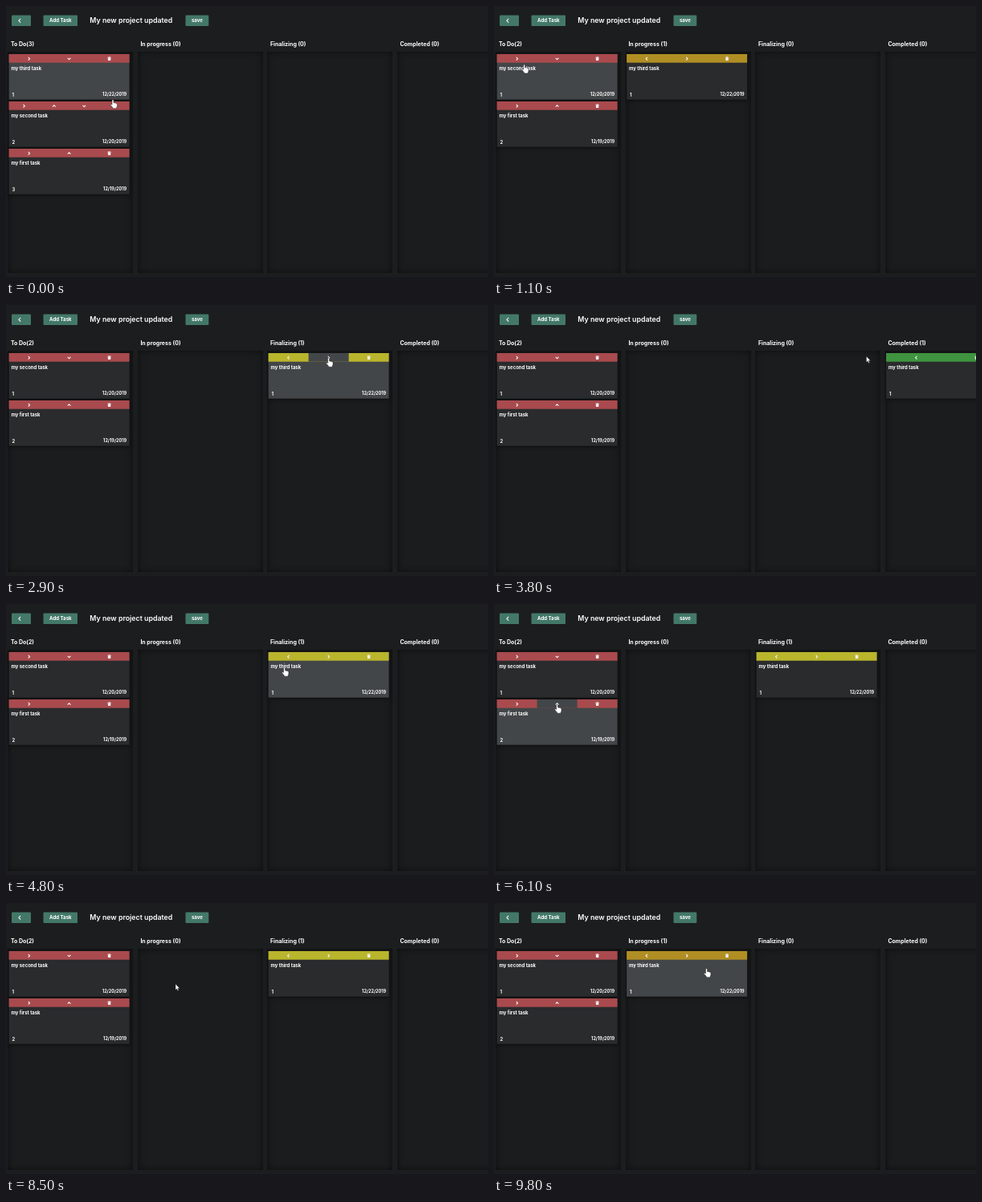
Write an HTML page that moves like this. It is 600 by 338 pixels and loops after 9.9 s.

```html
<!DOCTYPE html>
<html lang="en">
<head>
<meta charset="utf-8">
<title>Task board</title>
<style>
  html, body { margin: 0; width: 100%; height: 100%; overflow: hidden; background: #1c1d1e; }
  #stage { position: relative; width: 600px; height: 338px; overflow: hidden; }
  .col { position: absolute; top: 57px; width: 156px; height: 276px; background: #1b1c1d; box-shadow: inset 0 0 8px rgba(0, 0, 0, .55); }
  svg { position: absolute; left: 0; top: 0; }
  text { font-family: Inter, "Open Sans", sans-serif; font-weight: 700; fill: #fff; }
  .title { font-size: 8.8px; font-weight: 600; }
  .btn { font-size: 6.1px; text-anchor: middle; }
  .head { font-size: 7px; }
  .name { font-size: 5.95px; }
  .num { font-size: 5.8px; }
  .date { font-size: 5.5px; text-anchor: end; }
  .card { filter: drop-shadow(0 1px 2px rgba(0, 0, 0, .55)); }
  .line { fill: none; stroke: #f4f4f4; stroke-width: 1.1; }
</style>
</head>
<body>
<div id="stage">
  <svg width="600" height="338" viewBox="0 0 600 338">
    <g fill="#437868">
      <rect x="7" y="11.5" width="24" height="13.5" rx="1"/>
      <rect x="46.5" y="11.5" width="42.5" height="13.5" rx="1"/>
      <rect x="223.5" y="11.5" width="28.8" height="13.5" rx="1"/>
    </g>
    <path class="line" d="M18.2 15.8L15.9 18.2L18.2 20.6"/>
    <text class="btn" x="67.8" y="20.3">Add Task</text>
    <text class="btn" x="237.9" y="20.1">save</text>
    <text class="title" x="104.3" y="21.4">My new project updated</text>
    <g id="board"></g>
    <path id="arrow" d="M0 0V7.4L1.7 5.9L2.8 8.5L4 8L2.9 5.4H5.2Z" fill="#fff" stroke="#111" stroke-width=".4"/>
    <path id="hand" d="M-1 .9Q0 -.6 1 .9V4.1L2.3 4.2Q2.9 4 3.3 4.5L4.5 4.8Q5.4 4.8 5.4 5.9V8.4L4.6 10V11.2H-.1V10.2L-2.9 6.9Q-3.3 5.7 -2.1 5.7L-1 6.6Z" fill="#fff" stroke="#111" stroke-width=".45"/>
  </svg>
</div>
<script>
const LOOP = 9900, STEP = 100, PITCH = 161.5, ROW = 59;
const CARD = { x: 3.6, y: 60, w: 150, h: 56.7, bar: 10.7 };

const columns = [
  ['To Do', '#a94a4e'],
  ['In progress ', '#b08e24'],
  ['Finalizing ', '#b9b52c'],
  ['Completed ', '#3f9440']
];
const tasks = {
  a: ['my first task', '12/19/2019'],
  b: ['my second task', '12/20/2019'],
  c: ['my third task', '12/22/2019']
};

// Board contents from each click on, columns split by "|"
const boards = [
  [0, 'cba|||'], [800, 'ba|c||'], [2200, 'ba||c|'], [3000, 'ba|||c'],
  [4300, 'ba||c|'], [6500, 'ab||c|'], [7400, 'ba||c|'], [9400, 'ba|c||']
];

// Centre of button i out of n on a card
const button = (col, row, i, n) => [
  CARD.x + col * PITCH + (i + .5) * CARD.w / n,
  CARD.y + row * ROW + 6
];

// Pointer stops: arrival, departure, place, sag of the way there
const stops = [
  [0, 0, [133, 116.6]],
  [600, 1000, button(0, 0, 0, 3)],
  [1800, 2200, button(1, 0, 1, 3), 50],
  [2700, 3200, button(2, 0, 1, 3), 60],
  [3800, 3800, [463.5, 64], 18],
  [4100, 4400, button(3, 0, 0, 2)],
  [4600, 4700, [533, 45]],
  [4800, 4800, [346.5, 79]],
  [5000, 5100, [250, 69.5]],
  [6000, 6600, button(0, 1, 1, 3), 10],
  [7100, 8100, button(0, 0, 1, 3)],
  [8500, 8500, [211, 101]],
  [9300, 9400, button(2, 0, 0, 3)],
  [9800, LOOP, [264.5, 81.5]]
];

const icons = {
  right: '<path class="line" d="M-.9 -1.9L1 0L-.9 1.9"/>',
  left: '<path class="line" d="M.9 -1.9L-1 0L.9 1.9"/>',
  down: '<path class="line" d="M-1.9 -.8L0 1L1.9 -.8"/>',
  up: '<path class="line" d="M-1.9 .9L0 -.9L1.9 .9"/>',
  bin: '<path fill="#f4f4f4" d="M-2.2 -2H-.8V-2.5H.8V-2H2.2V-1.3H-2.2ZM-1.8 -.9H1.8L1.6 2.4H-1.6Z"/>'
};

const stage = document.getElementById('stage');
const board = document.getElementById('board');
const arrow = document.getElementById('arrow');
const hand = document.getElementById('hand');

columns.forEach((_, i) => {
  const col = document.createElement('div');
  col.className = 'col';
  col.style.left = 2 + i * PITCH + 'px';
  stage.prepend(col);
});

function pointerAt(t) {
  const i = stops.findIndex(s => t <= s[1]);
  const [arrive, , [x1, y1], sag = 0] = stops[i];
  if (t >= arrive) return [x1, y1];
  const [, leave, [x0, y0]] = stops[i - 1];
  const u = (t - leave) / (arrive - leave);
  const k = u * u * (3 - 2 * u);
  return [x0 + (x1 - x0) * k, y0 + (y1 - y0) * k + sag * Math.sin(Math.PI * k)];
}

function buttonsFor(col, row, count) {
  if (col === 3) return ['left', 'bin'];
  if (col > 0) return ['left', 'right', 'bin'];
  const list = ['right'];
  if (row > 0) list.push('up');
  if (row < count - 1) list.push('down');
  return [...list, 'bin'];
}

function drawCard(id, col, row, count, px, py) {
  const x = CARD.x + col * PITCH, y = CARD.y + row * ROW;
  const dx = px - x, dy = py - y;
  const over = dx >= 0 && dx < CARD.w && dy >= 0 && dy <= CARD.h;
  const fill = over ? '#424648' : '#2a2b2d';
  const list = buttonsFor(col, row, count), w = CARD.w / list.length;
  const hot = over && dy < CARD.bar
    ? `<rect x="${Math.floor(dx / w) * w}" width="${w}" height="${CARD.bar}" fill="${fill}"/>` : '';
  const marks = list.map((icon, i) =>
    `<g transform="translate(${(i + .5) * w} 5.7)">${icons[icon]}</g>`).join('');
  const [name, date] = tasks[id];
  const html = `<g transform="translate(${x} ${y})">
    <rect class="card" width="${CARD.w}" height="${CARD.h}" fill="${fill}"/>
    <rect width="${CARD.w}" height="${CARD.bar}" fill="${columns[col][1]}"/>${hot}${marks}
    <text class="name" x="2.9" y="19.6">${name}</text>
    <text class="num" x="4" y="53.1">${row + 1}</text>
    <text class="date" x="146.6" y="52.2">${date}</text></g>`;
  return { html, over };
}

let last = '';
function render(now) {
  const t = Math.floor((now % LOOP) / STEP) * STEP;
  const [px, py] = pointerAt(t);
  const layout = boards.filter(b => b[0] <= t).pop()[1].split('|');
  let html = '', over = false;
  layout.forEach((ids, col) => {
    html += `<text class="head" x="${5.9 + col * PITCH}" y="49.5">${columns[col][0]}(${ids.length})</text>`;
    [...ids].forEach((id, row) => {
      const card = drawCard(id, col, row, ids.length, px, py);
      html += card.html;
      over = over || card.over;
    });
  });
  if (html !== last) board.innerHTML = last = html;
  for (const [el, shown] of [[arrow, !over], [hand, over]]) {
    el.setAttribute('transform', `translate(${px} ${py})`);
    el.style.display = shown ? '' : 'none';
  }
}

const start = performance.now();
function tick() {
  render(performance.now() - start);
  requestAnimationFrame(tick);
}
tick();
</script>
</body>
</html>
```
